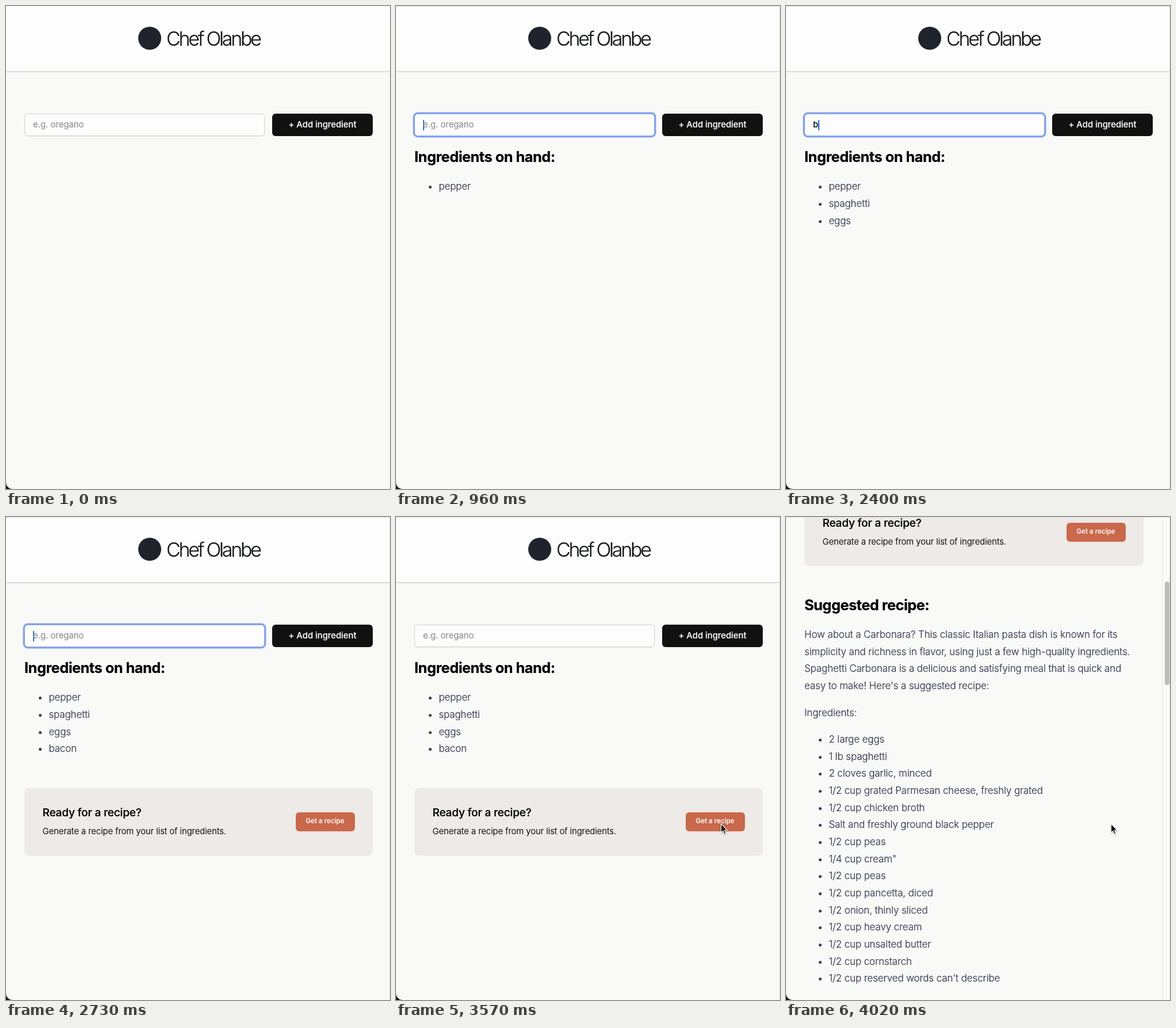
Write an HTML page that moves like this. It is 668x839 px and loops after 4.05 s.

```html
<!DOCTYPE html>
<html lang="en">
<head>
<meta charset="utf-8">
<title>Recipe helper</title>
<style>
* { box-sizing: border-box; margin: 0; }
html, body { width: 100%; height: 100%; overflow: hidden; background: #f9f9f7; }
body {
  position: relative;
  font: 300 16.94px/29.65px Inter, sans-serif;
  font-optical-sizing: none;
  letter-spacing: -.1px;
  color: #000;
  -webkit-text-stroke: .22px currentColor;
}
#page { position: absolute; left: 0; top: 0; width: 668px; height: 1500px; }
#page.long { width: 652px; }
#page > *, .panel > *, header > * { position: absolute; white-space: nowrap; }

header {
  left: 0; top: 0; width: 100%; height: 113px; background: #fdfdfd;
  box-shadow: 0 1px 3px rgba(0,0,0,.14), 0 1px 2px rgba(0,0,0,.1);
}
.logo { left: calc(50% - 104.5px); top: 36px; width: 40px; height: 40px; border-radius: 50%; background: #1f242c; }
h1 {
  left: calc(50% - 55px); top: 36px;
  font-size: 34px; line-height: 41.1px; font-weight: 300; letter-spacing: -3.25px; color: #14161a;
}

.field {
  left: 32px; right: 218px; top: 187px; height: 39px; padding: 1px 0 0 14px;
  display: flex; align-items: center;
  font-size: 14.82px; font-weight: 400; letter-spacing: 0;
  background: #fdfdfd; border: 1px solid #cfd0d4; border-radius: 6px;
  box-shadow: 0 1px 2px rgba(0,0,0,.06);
}
.field.focus { border-color: #89a6ec; box-shadow: 0 0 0 2.5px #82a2ec; }
.field.empty #typed { color: #949495; }
.caret { flex: none; width: 2px; height: 18px; margin-right: -2px; background: #1f6fe0; }
.field.empty .caret { order: -1; }
.btn {
  display: flex; align-items: center; justify-content: center;
  font-weight: 500; letter-spacing: 0; color: #fafaf8; border-radius: 6px;
}
.add { right: 30px; top: 187px; width: 175px; height: 39px; padding-top: 1px; font-size: 14.82px; background: #111; }

h2 { left: 32px; font-size: 25.4px; line-height: 30.7px; font-weight: 700; letter-spacing: -.53px; }
ul { left: 32px; padding-left: 42.4px; }
ul, .prose { color: #373c52; }
.prose { left: 32px; }

.panel { left: 32px; right: 30px; top: 470.5px; height: 117.5px; background: #edeae7; border-radius: 8px; }
h3 { left: 31.5px; top: 30px; font-size: 19.06px; line-height: 25.4px; font-weight: 500; letter-spacing: -.19px; }
.panel p { left: 31.5px; top: 61px; font-size: 14.82px; letter-spacing: 0; }
.get { right: 31.5px; top: 42.5px; width: 103px; height: 32.5px; font-size: 11.7px; background: #c9684b; }

.edge { position: absolute; inset: 0; border: solid #e0e0df; border-width: 1px 1px 0 0; }
.track { position: absolute; right: 0; top: 0; width: 13px; height: 100%; background: #fafaf9; border: solid #e7e7e6; border-width: 1px 1px 0 1px; }
.thumb { position: absolute; left: 3px; top: 0; width: 8px; height: 180px; border-radius: 4px; background: #bcbcbc; }
.corner { position: absolute; left: 0; bottom: 0; width: 11px; height: 11px; background: radial-gradient(circle at 100% 0, transparent 10.3px, #161616 11.3px); }
.pointer { position: absolute; left: 0; top: 0; overflow: visible; filter: drop-shadow(0 1px 1px rgba(0,0,0,.35)); }
[hidden] { display: none !important; }
</style>
</head>
<body>
<div id="page">
  <header><div class="logo"></div><h1>Chef Olanbe</h1></header>
  <div class="field" id="field"><span id="typed"></span><i class="caret" id="caret"></i></div>
  <div class="btn add">+ Add ingredient</div>

  <h2 id="onHand" style="top:247px">Ingredients on hand:</h2>
  <ul id="list" style="top:299.2px"></ul>

  <div class="panel" id="panel">
    <h3>Ready for a recipe?</h3>
    <p>Generate a recipe from your list of ingredients.</p>
    <div class="btn get">Get a recipe</div>
  </div>

  <h2 class="recipe" style="top:641px">Suggested recipe:</h2>
  <p class="recipe prose" style="top:693px">How about a Carbonara? This classic Italian pasta dish is known for its<br>simplicity and richness in flavor, using just a few high-quality ingredients.<br>Spaghetti Carbonara is a delicious and satisfying meal that is quick and<br>easy to make! Here's a suggested recipe:</p>
  <p class="recipe prose" style="top:828.5px">Ingredients:</p>
  <ul class="recipe" style="top:875px">
    <li>2 large eggs</li>
    <li>1 lb spaghetti</li>
    <li>2 cloves garlic, minced</li>
    <li>1/2 cup grated Parmesan cheese, freshly grated</li>
    <li>1/2 cup chicken broth</li>
    <li>Salt and freshly ground black pepper</li>
    <li>1/2 cup peas</li>
    <li>1/4 cup cream"</li>
    <li>1/2 cup peas</li>
    <li>1/2 cup pancetta, diced</li>
    <li>1/2 onion, thinly sliced</li>
    <li>1/2 cup heavy cream</li>
    <li>1/2 cup unsalted butter</li>
    <li>1/2 cup cornstarch</li>
    <li>1/2 cup reserved words can't describe</li>
  </ul>
</div>

<div class="edge" id="edge"></div>
<div class="track" id="track"><div class="thumb" id="thumb"></div></div>
<svg class="pointer" id="pointer" width="12" height="19">
  <path d="M0 0V15.2L3.4 12 5.8 17.6 8.3 16.5 6 11H10.7Z" stroke="#fff" stroke-width="1.2"/>
</svg>
<div class="corner"></div>

<script>
const LOOP = 4050, KEY_GAP = 55, SCROLL = 503;
const FOCUS = 240, CLICK = 3390, LOADED = 3630, SCROLL_FROM = 3660, SCROLL_TO = 3800;

// word, first key press, moment it joins the list
const words = [
  ['pepper', 450, 930],
  ['spaghetti', 1080, 1830],
  ['eggs', 1950, 2250],
  ['bacon', 2370, 2700],
];
const caretOff = [[1680, 1830], [2850, 3000]];
// time, x, y
const path = [[2910, 541, 431], [3060, 547.5, 465.2], [3240, 565.5, 533.2]];

const $ = id => document.getElementById(id);
const within = (t, a, b) => t >= a && t < b;
const show = (el, on) => { el.hidden = !on; };
const progress = (t, a, b) => Math.min(1, Math.max(0, (t - a) / (b - a)));
const smooth = p => p * p * (3 - 2 * p);

const items = words.map(([word]) => {
  const li = document.createElement('li');
  li.textContent = word;
  return $('list').appendChild(li);
});
const recipe = document.querySelectorAll('.recipe');

function typedAt(t) {
  const now = words.find(([, from, to]) => within(t, from, to));
  return now ? now[0].slice(0, 1 + Math.floor((t - now[1]) / KEY_GAP)) : '';
}

function pointerAt(t) {
  const [a, b, c] = path;
  const [from, to] = t < b[0] ? [a, b] : [b, c];
  const p = progress(t, from[0], to[0]);
  const k = from === a ? p * p : 1 - (1 - p) ** 2;
  return [1, 2].map(i => from[i] + (to[i] - from[i]) * k);
}

function draw(t) {
  const text = typedAt(t), focused = within(t, FOCUS, CLICK), loaded = t >= LOADED;
  $('typed').textContent = text || 'e.g. oregano';
  $('field').className = 'field' + (text ? '' : ' empty') + (focused ? ' focus' : '');
  show($('caret'), focused && !caretOff.some(([a, b]) => within(t, a, b)));

  words.forEach(([, , added], i) => show(items[i], t >= added));
  show($('onHand'), t >= words[0][2]);
  show($('panel'), t >= words[3][2]);

  const y = SCROLL * smooth(progress(t, SCROLL_FROM, SCROLL_TO));
  $('page').className = loaded ? 'long' : '';
  $('page').style.transform = `translateY(${-Math.round(y)}px)`;
  recipe.forEach(el => show(el, loaded));
  show($('track'), loaded);
  $('thumb').style.transform = `translateY(${3 + y * 108 / SCROLL}px)`;

  show($('edge'), t >= 90);
  $('pointer').style.display = t >= path[0][0] ? '' : 'none';
  const [px, py] = pointerAt(t);
  $('pointer').style.transform = `translate(${px}px, ${py}px)`;
}

const start = performance.now();
function tick() {
  draw((performance.now() - start) % LOOP);
  requestAnimationFrame(tick);
}
tick();
</script>
</body>
</html>
```
